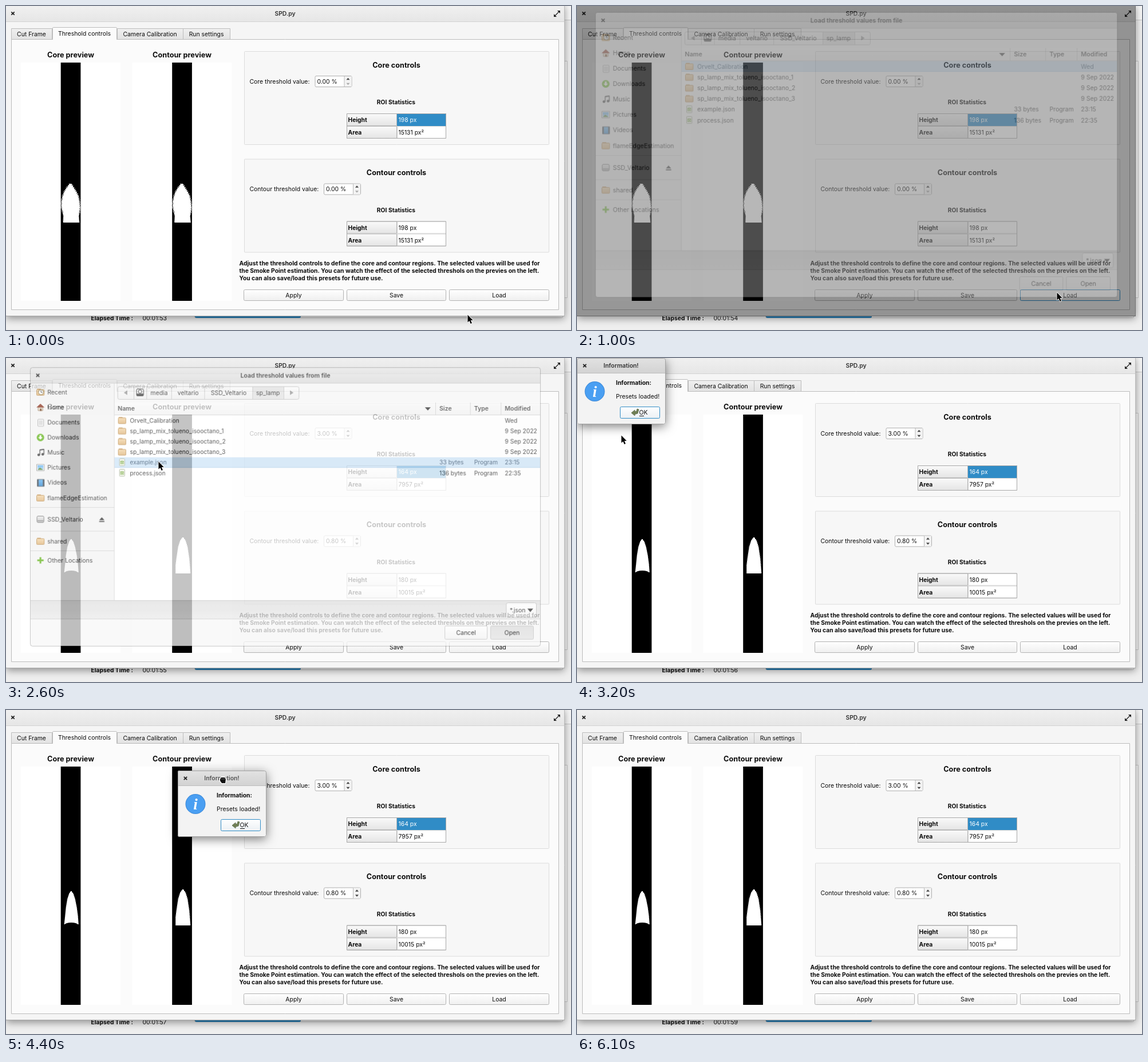
These frames come from a looping animation (987 px wide and 567 px high, 6.4 s). An HTML page with a canvas:

```html
<!DOCTYPE html>
<html lang="en">
<head>
<meta charset="utf-8">
<title>Threshold controls</title>
<style>
html, body { margin: 0; width: 100%; height: 100%; overflow: hidden; background: #efefef; }
canvas { display: block; }
</style>
</head>
<body>
<canvas id="stage" width="987" height="567"></canvas>
<script>
const W = 987, H = 567, LOOP = 6400, STEP = 100;
const BLUE = '#308cc6', INK = '#0c0c0c';
const stage = document.getElementById('stage').getContext('2d');
let g = stage;

// Linear interpolation through rows of [key, ...values].
function at(keys, t) {
  let i = keys.findIndex(k => k[0] > t);
  if (i < 0) return keys[keys.length - 1].slice(1);
  if (i === 0) return keys[0].slice(1);
  const a = keys[i - 1], b = keys[i], p = (t - a[0]) / (b[0] - a[0]);
  return a.slice(1).map((v, n) => v + (b[n + 1] - v) * p);
}

function text(s, x, y, { size = 10.4, weight = 400, color = INK, align = 'left' } = {}) {
  g.font = `${weight} ${size}px Inter, sans-serif`;
  g.textAlign = align;
  g.fillStyle = color;
  g.fillText(s, x, y + size * 0.36);
}
const center = (s, x, y, opts) => text(s, x, y, { align: 'center', ...opts });
const bold = { size: 10.3, weight: 700 };

function box(x, y, w, h, fill, stroke, r = 0) {
  g.beginPath();
  const o = stroke ? 0.5 : 0;
  g.roundRect(x + o, y + o, w - 2 * o, h - 2 * o, r);
  if (Array.isArray(fill)) {
    const grad = g.createLinearGradient(0, y, 0, y + h);
    fill.forEach((c, i) => grad.addColorStop(i / (fill.length - 1), c));
    fill = grad;
  }
  if (fill) { g.fillStyle = fill; g.fill(); }
  if (stroke) { g.strokeStyle = stroke; g.lineWidth = 1; g.stroke(); }
}

function poly(points, fill, stroke, width = 1) {
  g.beginPath();
  points.forEach(([x, y]) => g.lineTo(x, y));
  g.closePath();
  if (stroke) { g.strokeStyle = stroke; g.lineWidth = width; g.lineJoin = 'round'; g.stroke(); }
  if (fill) { g.fillStyle = fill; g.fill(); }
}

function line(x1, y1, x2, y2, color, width = 1) {
  g.beginPath();
  g.moveTo(x1, y1);
  g.lineTo(x2, y2);
  g.strokeStyle = color;
  g.lineWidth = width;
  g.stroke();
}

function disc(x, y, r, fill) {
  g.beginPath();
  g.arc(x, y, r, 0, 7);
  g.fillStyle = fill;
  g.fill();
}

const triangle = (x, y, w, h, color = '#333') =>
  poly([[x - w, y - h], [x + w, y - h], [x, y + h]], color);

function closeMark(x, y) {
  line(x - 2.7, y - 2.7, x + 2.7, y + 2.7, '#222', 1.8);
  line(x + 2.7, y - 2.7, x - 2.7, y + 2.7, '#222', 1.8);
}

function shadowed(blur, alpha, draw) {
  g.save();
  g.shadowColor = `rgba(0,0,0,${alpha})`;
  g.shadowBlur = blur;
  g.shadowOffsetY = 4;
  draw();
  g.restore();
}

function button(label, x, y, w, h, stroke = '#b3b3b3', fill = ['#ffffff', '#efefef']) {
  box(x, y, w, h, fill, stroke, 2);
  center(label, x + w / 2, y + h / 2);
}

// ---- main window ----

const WIDE = [[311, 15, 19], [316, 11, 22], [324, 6, 27], [332, 3, 31], [342, 1, 33],
  [352, 1, 34], [360, 3, 33], [367, 4.5, 31.5], [378, 4, 32.5]];
const CORE = [[317, 17, 19], [321, 14.5, 22], [330, 11.5, 25], [345, 9, 28], [360, 7.5, 30], [374, 6, 31]];
const CONTOUR = [[314, 17.5, 20], [319, 14, 23.5], [330, 10.5, 27], [350, 7.5, 30], [362, 6, 31], [376, 6, 32]];

function flame(x, shape, rough) {
  g.fillStyle = '#fff';
  for (let y = shape[0][0]; y <= shape[shape.length - 1][0]; y++) {
    const [l, r] = at(shape, y);
    const jag = y < 364 ? rough : rough * 0.3;
    const a = Math.sin(y * 2.7) * jag, b = Math.sin(y * 2.3 + 1) * jag;
    const from = Math.max(0, l + a), to = Math.min(34.5, r + b);
    g.fillRect(x + from, y, to - from, 1);
  }
}

function preview(title, x, shape, rough) {
  center(title, x + 87, 85, { size: 12.7, weight: 700 });
  box(x, 99, 174, 417, '#fff');
  box(x + 69.7, 99, 34.7, 417, '#000');
  flame(x + 69.7, shape, rough);
}

function controls(name, y, spinX, value, height, area, selected) {
  box(416, y, 533, 164, '#f7f7f7', '#dcdcdc', 1);
  center(name + ' controls', 682, y + 24, { size: 12.7, weight: 700 });
  text(name + ' threshold value:', 425.5, y + 53);
  box(spinX, y + 43, 65, 20, '#fff', '#b0b0b0', 2);
  box(spinX + 52, y + 44, 12, 18, '#f3f3f3');
  line(spinX + 51.5, y + 44, spinX + 51.5, y + 62, '#b8b8b8');
  text(value, spinX + 4, y + 53);
  triangle(spinX + 58, y + 48.5, 3, -1.7, '#444');
  triangle(spinX + 58, y + 57.5, 3, 1.7, value === '0.00 %' ? '#aaa' : '#444');

  center('ROI Statistics', 681.5, y + 89.5, bold);
  [['Height', height], ['Area', area]].forEach(([label, v], i) => {
    const top = y + 109 + i * 22, on = selected && !i;
    box(595, top, 88, 22, ['#fafafa', '#e4e4e4'], '#b9b9b9');
    box(683, top, 86, 22, on ? BLUE : '#fff', on ? null : '#d0d0d0');
    text(label, 597.5, top + 11.5, bold);
    text(v, 685.5, top + 11.5, { color: on ? '#fff' : INK });
  });
  box(595, y + 109, 174, 44, null, '#a8a8a8');
}

function mainWindow(t) {
  const loaded = t >= 2600;
  box(0, 0, W, H, '#efefef');
  box(976, 0, 11, 24, '#f8f8f8');
  line(976, 24.5, W, 24.5, '#c8c8c8');
  box(900, 96, 81, 415, '#f7f7f7', '#c8c8c8');
  text('Elapsed Time :', 148.5, 546, bold);
  text('00:01:' + (53 + Math.floor((t + 100) / 1000)), 238.5, 546);
  box(329, 530, 644, 16, '#f4f4f4', '#c0c0c0', 2);
  box(330, 530, 185, 16, BLUE, '#2475a8', 2);

  shadowed(14, 0.4, () => box(0, -4, 976, 547, '#f5f5f5', null, 3));
  box(0, 0, 976, 27, ['#f0f0f0', '#e6e6e6']);
  line(0, 27.5, 976, 27.5, '#d2d2d2');
  line(975.5, 0, 975.5, 543, '#bdbdbd');
  line(0, 542.5, 976, 542.5, '#a8a8a8');
  closeMark(12, 13);
  center('SPD.py', 487.5, 13.5, { weight: 600, color: '#333' });
  line(959, 17, 966, 10, '#222', 1.3);
  poly([[963, 8], [968, 8], [968, 13]], '#222');
  poly([[957, 14], [957, 19], [962, 19]], '#222');

  box(9, 58, 957, 474, '#fbfbfb', '#bcbcbc');
  [['Cut Frame', 9, 72], ['Camera Calibration', 194, 116], ['Run settings', 309, 83]].forEach(([s, x, w]) => {
    box(x, 39, w, 20, ['#f0f0f0', '#e2e2e2'], '#bcbcbc');
    center(s, x + w / 2 - 0.5, 49);
  });
  box(81, 37, 113, 22, '#fbfbfb', '#bcbcbc', 1);
  box(82, 57, 111, 3, '#fbfbfb');
  center('Threshold controls', 137, 48.5);

  preview('Core preview', 26, loaded ? CORE : WIDE, loaded ? 0.3 : 1.2);
  preview('Contour preview', 220.5, loaded ? CONTOUR : WIDE, loaded ? 0.5 : 1.2);
  if (loaded) {
    g.beginPath();
    g.ellipse(114, 375, 11, 3, 0, 0, 7);
    g.fillStyle = '#000';
    g.fill();
    controls('Core', 79, 539.5, '3.00 %', '164 px', '7957 px²', true);
    controls('Contour', 267.5, 555, '0.80 %', '180 px', '10015 px²');
  } else {
    controls('Core', 79, 539.5, '0.00 %', '198 px', '15131 px²', true);
    controls('Contour', 267.5, 555, '0.00 %', '198 px', '15131 px²');
  }
  ['Adjust the threshold controls to define the core and contour regions. The selected values will be used for',
    'the Smoke Point estimation. You can watch the effect of the selected threshols on the previes on the left.',
    'You can also save/load this presets for future use.'
  ].forEach((s, i) => text(s, 407.5, 450.5 + i * 13.1, bold));
  const pressed = t >= 800 && t < 1200;
  button('Apply', 415, 496, 175, 20);
  button('Save', 595, 496, 174, 20);
  button('Load', 774, 496, 175, 20, pressed ? BLUE : undefined);

  const dim = loaded ? 0 : at([[800, 0], [1000, 0.4]], t)[0];
  if (dim) box(0, 0, 976, 543, `rgba(0,0,0,${dim})`);
}

// ---- file dialog ----

const icons = {
  folder(x, y) {
    box(x - 6, y - 6, 7, 4, '#c99a5c', null, 1);
    box(x - 7, y - 5, 14, 11, ['#f5d9ac', '#dfb57c'], '#c1965c', 1);
  },
  recent(x, y) {
    icons.folder(x, y);
    disc(x + 1, y, 4.8, '#8a7440');
    disc(x + 1, y, 3.8, '#fff');
    line(x + 1, y - 3, x + 1, y + 0.5, '#444');
    line(x + 1, y + 0.5, x + 3.5, y + 0.5, '#444');
  },
  home(x, y) {
    box(x - 4.5, y - 1, 9, 7, '#eadfcd', '#a08468');
    box(x - 1, y + 2, 3, 4, '#7b4a2a');
    poly([[x - 7, y], [x, y - 6.5], [x + 7, y]], '#8f3b26');
  },
  document(x, y) {
    box(x - 5, y - 6, 11, 13, '#fafafa', '#aaa', 1);
    for (let i = -3; i < 5; i += 2) line(x - 3, y + i + 0.5, x + 4, y + i + 0.5, '#bbb');
  },
  download(x, y) {
    disc(x, y, 6.5, '#68b723');
    box(x - 1.5, y - 4, 3, 4, '#fff');
    triangle(x, y + 1.5, 4, 2, '#fff');
  },
  music(x, y) {
    disc(x - 3, y + 4, 2.3, '#444');
    disc(x + 4, y + 3, 2.3, '#444');
    line(x - 1, y + 4, x - 1, y - 5, '#444', 1.3);
    line(x + 6, y + 3, x + 6, y - 6, '#444', 1.3);
    line(x - 1, y - 4.5, x + 6, y - 5.5, '#444', 2);
  },
  picture(x, y) {
    box(x - 7, y - 6, 14, 12, '#fff', '#999');
    box(x - 5, y - 4, 10, 8, ['#5fb0f0', '#b5dcf8']);
    poly([[x - 5, y + 4], [x - 1, y], [x + 5, y + 4]], '#5d8a3a');
  },
  video(x, y) {
    box(x - 6, y - 6, 13, 13, '#45535f', null, 1);
    box(x - 3, y - 5, 7, 11, ['#65b5f2', '#3689d0']);
  },
  drive(x, y) {
    box(x - 6.5, y - 6, 13, 12, ['#f4f4f4', '#b9b9b9'], '#777', 2);
    line(x - 5, y + 2.5, x + 5, y + 2.5, '#777');
  },
  outline(x, y) {
    box(x - 6.5, y - 6.5, 13, 13, null, '#333', 2);
    box(x - 6, y + 2, 12, 4, '#444');
    g.beginPath();
    g.arc(x, y - 1.5, 3, 0, 7);
    g.stroke();
  },
  plus(x, y) {
    box(x - 5.5, y - 1.5, 11, 3, '#68b723');
    box(x - 1.5, y - 5.5, 3, 11, '#68b723');
  },
  script(x, y) {
    box(x - 5, y - 7, 10, 13, '#f6f8f0', '#a9b39a', 1);
    box(x - 3, y - 3, 6, 6, '#7fae4a', null, 1);
    center('{}', x, y, { size: 5.5, weight: 700, color: '#fff' });
  }
};

const PLACES = [['recent', 'Recent', 62], ['home', 'Home', 88.5], ['document', 'Documents', 114.5],
  ['download', 'Downloads', 140.5], ['music', 'Music', 166.5], ['picture', 'Pictures', 192.5],
  ['video', 'Videos', 218.5], ['folder', 'flameEdgeEstimation', 245], ['drive', 'SSD_Veltario', 282],
  ['folder', 'shared', 320], ['plus', 'Other Locations', 353]];
const FILES = [['Orvelt_Calibration', 'Wed'], ['sp_lamp_mix_tolueno_isooctano_1', '9 Sep 2022'],
  ['sp_lamp_mix_tolueno_isooctano_2', '9 Sep 2022'], ['sp_lamp_mix_tolueno_isooctano_3', '9 Sep 2022'],
  ['example.json', '23:15', '33 bytes'], ['process.json', '22:35', '136 bytes']];

function fileDialog(t) {
  const edge = '#d4d4d4', grey = { weight: 600, color: '#4a4a4a' };
  box(48, 20, 880, 481, '#f7f7f7', null, 3);
  box(48, 20, 880, 27, ['#ececec', '#dedede'], null, [3, 3, 0, 0]);
  line(48, 46.5, 928, 46.5, '#cacaca');
  closeMark(60.5, 33);
  center('Load threshold values from file', 488, 33.5, { weight: 600, color: '#333' });

  box(48, 47, 145, 376, '#f4f4f4');
  line(192.5, 47, 192.5, 423, edge);
  for (const y of [261.5, 302.5, 336.5]) line(48, y, 192, y, edge);
  for (const [icon, label, y] of PLACES) {
    icons[icon](65, y);
    text(label, 77, y, { color: '#333' });
  }
  triangle(171, 281, 4.5, -2.5);
  box(166.5, 285, 9, 1.6, '#333');

  box(198, 52, 314, 23, ['#fdfdfd', '#f0f0f0'], '#c4c4c4', 3);
  box(431, 53, 54, 21, '#e4e4e4');
  for (const x of [226.5, 248.5, 291.5, 348.5, 431.5, 485.5]) line(x, 53, x, 74, '#c9c9c9');
  poly([[209, 63], [215, 59], [215, 67]], '#999');
  poly([[502, 63], [496, 59], [496, 67]], '#999');
  icons.outline(237, 62.5);
  [['media', 270], ['veltario', 320], ['SSD_Veltario', 390], ['sp_lamp', 458]]
    .forEach(([s, x]) => center(s, x, 63, { color: '#333' }));

  box(193, 80, 735, 22, ['#fbfbfb', '#f3f3f3']);
  box(193, 102, 735, 321, '#fff');
  line(193, 101.5, 928, 101.5, edge);
  for (const x of [747.5, 807.5, 860.5]) line(x, 80, x, 101, edge);
  [['Name', 198.5], ['Size', 754], ['Type', 814], ['Modified', 867]]
    .forEach(([s, x]) => text(s, x, 90.5, grey));
  triangle(734, 91, 5, 2.7);

  const chosen = t >= 2100 ? 4 : 0;
  FILES.forEach(([name, date, size], i) => {
    const y = 111 + i * 18.2, style = { size: 10.2, color: i === chosen ? '#3d5873' : '#333' };
    if (i === chosen) {
      box(193, y - 9, 735, 18, '#cfe5f8');
      line(193, y + 8.5, 928, y + 8.5, '#b9d6ee');
    }
    icons[size ? 'script' : 'folder'](206, y);
    text(name, 219.5, y, style);
    text(date, 867, y, style);
    if (size) {
      text(size, 754, y, style);
      text('Program', 814, y, style);
    }
  });

  box(48, 423, 880, 32, ['#e2e2e2', '#ececec']);
  line(48, 422.5, 928, 422.5, '#c8c8c8');
  line(48, 454.5, 928, 454.5, '#d0d0d0');
  box(869, 426, 53, 26, ['#ffffff', '#f4f4f4'], '#c0c0c0', 3);
  text('*.json', 875.5, 439.5, { color: '#333' });
  triangle(911, 439.5, 5, 3);
  button('Cancel', 763, 466, 74, 24, '#c4c4c4', ['#ffffff', '#f4f4f4']);
  button('Open', 842, 466, 75, 24, '#c4c4c4', t >= 2300 ? ['#dedede', '#e6e6e6'] : ['#ffffff', '#f4f4f4']);
  box(47, 19, 882, 483, null, 'rgba(0,0,0,0.28)', 4);
}

// ---- message box ----

function infoDialog(x, y, dragging) {
  g.save();
  g.translate(x, y);
  shadowed(18, 0.5, () => box(0, 0, 155, 116, '#f3f3f3', null, 3));
  box(0, 0, 155, 27, ['#e2e2e2', '#d2d2d2'], null, [3, 3, 0, 0]);
  line(0, 26.5, 155, 26.5, '#bdbdbd');
  box(0, 0, 155, 116, null, '#a2a2a2', 3);
  closeMark(13.5, 13.5);
  center('Information!', 77, 13.5, { weight: 600, color: dragging ? '#555' : '#333' });
  disc(31, 58.5, 17.5, '#3b88d8');
  disc(31, 58.5, 16.5, '#4a9ff2');
  g.font = 'italic 700 27px "Liberation Serif", serif';
  g.textAlign = 'center';
  g.fillStyle = '#fff';
  g.fillText('i', 31, 67.5);
  text('Information:', 68, 43.5, bold);
  text('Presets loaded!', 68, 67.5);
  box(75, 85, 70, 21, ['#ffffff', '#ebf0f4'], BLUE, 2);
  poly([[95, 96], [101, 91], [101, 94], [104, 93], [105, 89], [108, 90], [106, 97], [101, 98.5], [101, 101]], '#6f7f55', '#4a5538', 0.8);
  text('OK', 108.5, 95.5);
  line(109, 101.5, 117, 101.5, INK);
  g.restore();
}

// ---- pointer ----

const POINTER = [[0, 806, 540], [400, 838, 501], [1100, 838, 501], [1500, 345, 225], [1600, 293, 197],
  [2000, 266, 181], [2600, 266, 181], [3200, 77, 135], [3700, 77, 135], [3800, 79, 17],
  [3900, 174, 31], [4000, 260, 52], [4400, 379, 123], [4600, 418, 146], [4700, 418, 146],
  [5100, 462, 223], [5300, 462, 223], [5500, 400, 315], [5800, 186, 90], [6000, 96, 0], [6100, -40, -40]];
const GRAB = [79, 17];

function arrow(x, y) {
  const shape = [[0, 0], [0, 13], [3, 10.4], [5.2, 15.4], [7.4, 14.4], [5.2, 9.6], [9.2, 9.4]];
  poly(shape.map(([a, b]) => [x + 0.5 + a, y + 0.5 + b]), '#000', '#fff', 1.6);
}

function fist(x, y) {
  const shape = [[-5, -2], [-3, -5], [3, -5], [5, -2], [4, 5], [-2, 5], [-5, 1]];
  poly(shape.map(([a, b]) => [x + a, y + b]), '#111', '#fff', 2.4);
  for (const i of [-2, 0.5, 3]) line(x + i, y - 4, x + i, y - 1, '#888', 0.7);
}

// ---- composition ----

const layer = document.createElement('canvas');
layer.width = W;
layer.height = H;
const layerCtx = layer.getContext('2d');

// Draws a window as one group that fades while it grows a little about (cx, cy).
function fading(level, cx, cy, draw) {
  if (level <= 0) return;
  if (level >= 1) return draw();
  g = layerCtx;
  g.clearRect(0, 0, W, H);
  draw();
  g = stage;
  const scale = 1 + 0.05 * (1 - level);
  g.save();
  g.globalAlpha = level;
  g.translate(cx, cy);
  g.scale(scale, scale);
  g.drawImage(layer, -cx, -cy);
  g.restore();
}

function render(t) {
  mainWindow(t);
  const [file] = at([[900, 0], [1000, 0.3], [1200, 1], [2500, 1], [2600, 0.77], [2800, 0]], t);
  fading(file, 488, 260.5, () => fileDialog(t));

  const [px, py] = at(POINTER, t);
  const dragging = t >= 3800 && t < 4700;
  const [hx, hy] = at(POINTER, Math.max(3800, Math.min(t, 4600)));
  const dx = hx - GRAB[0], dy = hy - GRAB[1];
  const [info] = at([[2700, 0], [2800, 0.3], [3000, 1], [5300, 1], [5400, 0.77], [5600, 0]], t);
  fading(info, dx + 77, dy + 58, () => infoDialog(dx, dy, dragging));

  (dragging ? fist : arrow)(px, py);
}

function frame(now) {
  render(Math.floor((now % LOOP) / STEP) * STEP);
  requestAnimationFrame(frame);
}
requestAnimationFrame(frame);
</script>
</body>
</html>
```
